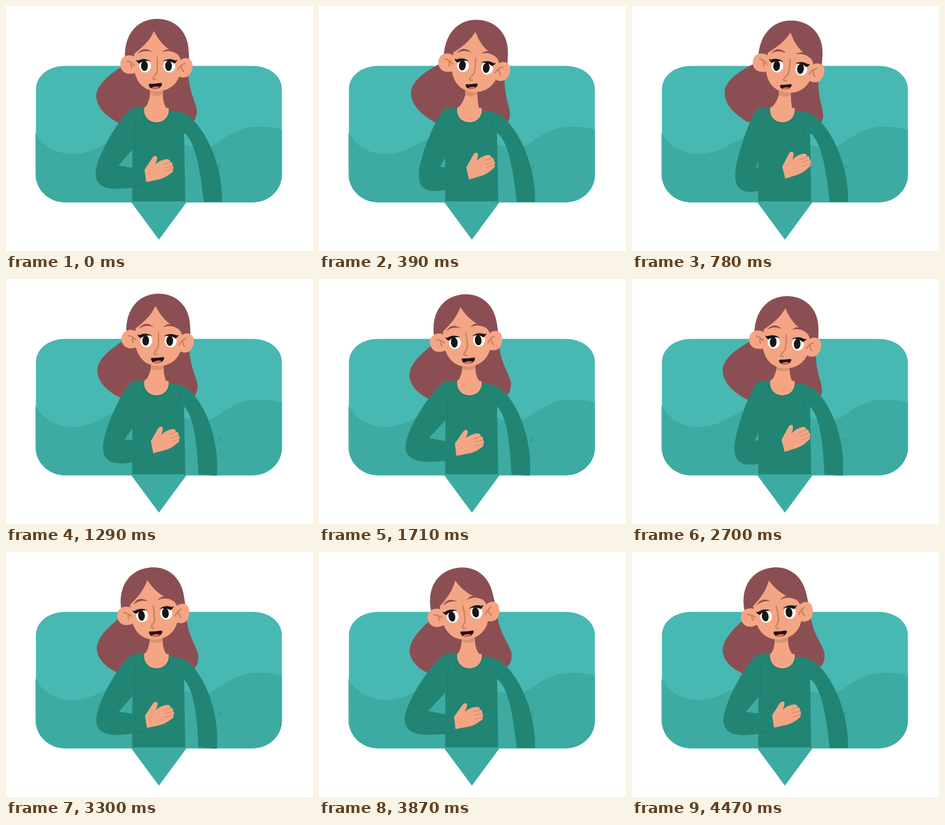
An HTML page for the animation above (4500 ms loop, 500x400 px).

```html
<!DOCTYPE html>
<html lang="en">
<head>
<meta charset="utf-8">
<title>Talking woman in a speech bubble</title>
<style>
html, body { margin: 0; width: 100%; height: 100%; overflow: hidden; background: #fff; }
svg { display: block; width: 100vw; height: 100vh; }
.skin { fill: #f4a684; }
.hair { fill: #8b4f53; }
.knit { fill: #228573; }
.wave { fill: #3daba2; }
.line { fill: none; stroke-linecap: round; stroke-linejoin: round; }
.fold { stroke: #1b7465; stroke-width: 0.9; }
.crease { stroke: #c98262; stroke-width: 2.3; }
.lash { fill: #151515; }
</style>
</head>
<body>
<svg viewBox="0 0 500 400">
  <!-- bubble -->
  <path fill="#48b8b3" d="M97 97.700H401C430 97.700 449.300 115 449.300 136V276C449.300 300 428 320.500 402 320.500H96C70 320.500 48.700 300 48.700 276V136C48.700 115 68 97.700 97 97.700Z"/>
  <path class="wave" d="M48 207C60 229 82 241.500 109 241.500C152 241.500 164 213 206 210C260 206 304 245 340 226C366 208 383 197 411 197Q434 197 449.300 202V276C449.300 300 428 320.500 402 320.500H96C70 320.500 48.500 300 48.500 276Z"/>
  <path class="line" stroke="#b5cecb" stroke-width="1" d="M47.900 208V283"/>
  <path class="wave" d="M203.300 319.500H294.700L249 381.500Z"/>
  <path class="line" stroke="#228573" stroke-width="0.8" d="M345.500 266Q346 260 348.500 260.500Q350.500 262 349.500 264"/>

  <path id="mane" class="hair" d="M194 95C173 109 148 126 147 147C148 171 171 185 190 194L250 184L302 192Q310 186 311 172C310 155 295 138 297 98L250 80Z"/>

  <!-- body -->
  <path id="armR" class="knit" d="M265 171C284 171 298 176 311 193C335 222 353 272 352 320H322C318 286 312 224 290 207Z"/>
  <path class="knit" d="M206 167L225 166L265 167V171Q286 173 290 183V208L292 319H205.500Z"/>
  <path id="armL" class="knit"/>
  <path id="neck" class="skin"/>
  <path id="shade" fill="#d8946f"/>
  <path class="line fold" d="M222.500 173C224 184 233 191 245 191C257 191 265 184 266.500 174"/>
  <path id="foldL" class="line fold" d="M211 184Q208 205 210 233"/>
  <path id="foldR" class="line fold" d="M285 185Q279 196 279.500 210"/>
  <path id="cuff" class="line fold" d="M208 295Q218 294 226 292"/>

  <g id="hand">
    <path class="skin" d="M225.500 267.500L237 250Q240.500 244 244.500 245Q248.500 246.500 243 258.500Q251 251 262 250Q268 250.500 267 254.500Q272 255 271 260Q274 262 272 266.500Q273 271 268 273.500Q258 282 245 284L228.500 287.500Z"/>
    <path class="line" stroke="#d58a69" stroke-width="1.1" d="M256 259L267 255.500M258 264.500L270.500 261M258 270.500L271.500 267"/>
  </g>

  <g id="head">
    <path class="hair" d="M194 87C191 48 213 21 246 21C276 21 296 42 297.500 72L299 100L270 108L208 92Z"/>
    <path class="skin" d="M211 84C206 80 197 79 190.500 84C184 90 185 102 191 107C196 112 205 111 211 109Z"/>
    <path class="skin" d="M281 91C287 84 298 83 302.500 91C306 100 302 111 296 115C290 118 283 117 279 113Z"/>
    <path class="skin" d="M241 41C234 56 224 66 209 78L208 96C209 122 223 139 246 139C270 139 285 122 285 98C286 84 281 79 273 75C259 68 249 57 241 41Z"/>
    <path class="line crease" d="M197 90Q204 91 209 97M204 94Q203 98 205 101M291 94Q284 96 280 104M286 99Q286 104 289 107"/>
    <path class="hair" d="M214 78.500Q224 64 238.500 75.500Q225 70.500 214 78.500ZM278.500 78.500Q267 64 253.500 75.500Q267 70.500 278.500 78.500Z"/>
    <ellipse cx="226.500" cy="98" rx="9.800" ry="10.500" fill="#fff"/>
    <ellipse cx="266" cy="98" rx="9.800" ry="10.500" fill="#fff"/>
    <ellipse cx="225.500" cy="97.800" rx="5.500" ry="8.300" fill="#151515"/>
    <ellipse cx="264.700" cy="97.800" rx="5.500" ry="8.300" fill="#151515"/>
    <path class="lash" d="M211.500 88L215 89Q225 83.500 236 90Q225 88 217 94Q213.500 92 211.500 88Z"/>
    <path class="lash" d="M279.500 88L276 89Q266 83.500 255 90Q266 88 274 94Q277.500 92 279.500 88Z"/>
    <path class="line crease" d="M246 84Q247 97 246 107C245 113 239 115 239.500 119Q241 121 244 120"/>
    <g id="mouth">
      <path fill="#191717" d="M234 127Q243 127 252 125.500Q255 125.500 254 128.500C252 134 246 136 239 135.500Q233.500 134 232.500 129Q232 127 234 127Z"/>
      <path fill="#ef6464" d="M236 134.500Q242 129.500 250.500 132Q246 136 239 135.500Z"/>
    </g>
  </g>
</svg>
<script>
const LOOP = 4500, STEP = 30;
const el = id => document.getElementById(id);
const set = (id, name, value) => el(id).setAttribute(name, value);
const clamp = v => Math.max(0, Math.min(1, v));
const smooth = v => { v = clamp(v); return v * v * (3 - 2 * v); };

// time, tilt in degrees, shift x, shift y
const headKeys = [
  [0, 0, 0, 0], [600, 7.3, 1, 1.8], [780, 7.2, 1.1, 2.2], [1290, 0.6, 1.3, 3],
  [1800, -6, 1.6, 3.6], [2130, -3.5, 1.3, 4.7], [2620, 4.7, -1, 6.7], [2700, 4.4, -1, 6.8],
  [3300, -6, 2.4, 3.4], [3650, -9.6, 2.7, 2.6], [4250, -10.2, 2.7, 2.6], [4500, -9.3, 2.7, 2.6]
];
// time, reach of the bent arm across the chest
const reachKeys = [
  [0, 0], [520, 20], [740, 22.3], [1290, 12], [1770, -5.5], [1960, -5.5], [2130, 6],
  [2560, 22], [2700, 21], [3300, 1], [3620, -6.5], [4310, -6], [4500, 5]
];

// Cubic through the keys, flat at turning points.
function track(keys, t, col) {
  const last = keys.length - 1;
  let i = 0;
  while (i < last - 1 && t >= keys[i + 1][0]) i++;
  const slope = k => (keys[k + 1][col] - keys[k][col]) / (keys[k + 1][0] - keys[k][0]);
  const tangent = k => {
    if (k === 0) return slope(0);
    if (k === last) return slope(last - 1);
    const a = slope(k - 1), b = slope(k);
    return a * b <= 0 ? 0 : 2 * a * b / (a + b);
  };
  const [a, b] = [keys[i], keys[i + 1]];
  const span = b[0] - a[0], u = (t - a[0]) / span, w = u * u * (3 - 2 * u);
  return a[col] * (1 - w) + b[col] * w
    + span * u * (1 - u) * ((1 - u) * tangent(i) - u * tangent(i + 1));
}

const ramp = (t, mid) => smooth((t - mid) / 180 + 0.5);

function draw(t) {
  const [tilt, x, y] = [1, 2, 3].map(c => track(headKeys, t, c));
  const place = a => `translate(${x} ${y}) rotate(${a} 248 168)`;
  set("head", "transform", place(tilt));
  set("mane", "transform", place(tilt * 0.85));
  // The mouth stays level while the head tilts.
  const narrow = 1 - 0.017 * Math.max(tilt, 0);
  set("mouth", "transform", `translate(${243 + y * 0.6} ${131 - y * 0.35}) rotate(${-tilt}) scale(${narrow}) translate(-243 -131)`);

  // The neck's upper end follows the chin.
  const rad = tilt * Math.PI / 180;
  const nx = x + 28 * Math.sin(rad), l = 234.5 + nx, r = 255.5 + nx * 0.7, top = 134 + y;
  set("neck", "d", `M${l} ${top}H${r}V146Q${r + 0.5} 158 260.500 166L265 167V171A20 19 0 0 1 225 171V166Q${231 + nx * 0.3} 164 ${l} 146Z`);
  set("shade", "d", `M${l} ${top}H${r}V${144 + y * 0.6}Q${(l + r) / 2} ${150 + y * 0.6} ${l} ${144 + y * 0.6}Z`);

  const d = track(reachKeys, t, 1), low = 298.5 + Math.max(d, 0) * 0.22;
  const ix = 183 + d * 0.83, iy = 260.5 + d * 0.14;
  set("armL", "d", `M206 167C${191 + d * 0.2} 174 ${150 + d} 237 ${146 + d} 272`
    + `C${145 + d} ${290 + d * 0.2} ${157 + d * 0.8} ${low} ${180 + d * 0.6} ${low}`
    + `Q${204 + d * 0.3} ${low} ${228 + d * 0.9} ${292 - d * 0.3}L${225 + d * 0.9} ${266 - d * 0.2}`
    + `Q${203 + d} ${264 + d * 0.05} ${ix} ${iy}L207 ${233 + d * 0.75}L225 205L226 168Z`);
  set("hand", "transform", `translate(${d * 0.91} ${-d * 0.25}) rotate(${-d * 0.27} 228 278)`);
  set("cuff", "transform", `translate(${d * 0.9} ${-d * 0.25})`);
  set("cuff", "opacity", clamp((12 - d) / 5));
  set("foldL", "opacity", clamp((10 - d) / 4));
  set("foldR", "opacity", clamp((d - 2) / 6));

  const swing = ramp(t, 930) - ramp(t, 1850) + ramp(t, 2450) - ramp(t, 3550);
  set("armR", "transform", `translate(283 180) rotate(${3.5 * swing}) scale(1 ${1 - 0.02 * swing}) translate(-283 -180)`);
}

const start = performance.now();
function tick() {
  const t = (performance.now() - start) % LOOP;
  draw(Math.floor(t / STEP) * STEP);
  requestAnimationFrame(tick);
}
draw(0);
requestAnimationFrame(tick);
</script>
</body>
</html>
```
